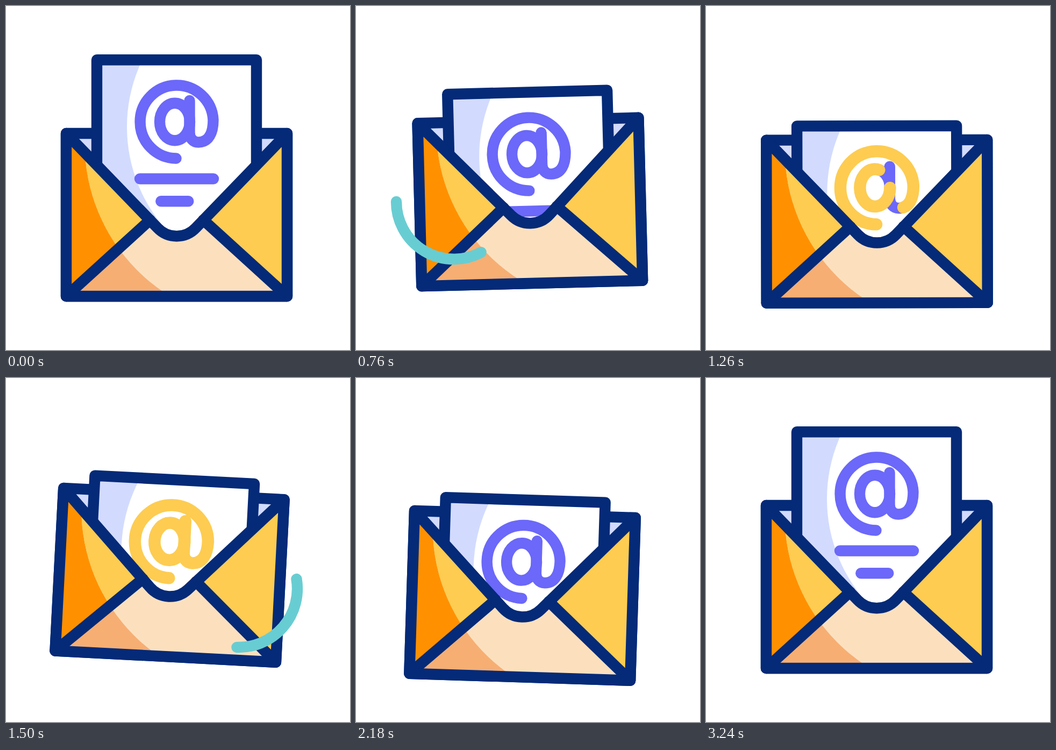
Animation, 640 px wide and 640 px high, one loop 3540 ms. Source, as an HTML page:

```html
<!DOCTYPE html>
<html lang="en">
<head>
<meta charset="utf-8">
<title>Mail</title>
<style>
  html, body { margin: 0; width: 100%; height: 100%; overflow: hidden; background: #fff; }
  svg { display: block; width: 100%; height: 100%; }
  .line { fill: none; stroke-width: 20.4; stroke-linecap: round; stroke-linejoin: round; }
  .navy { stroke: #042a78; }
  .ink { stroke: #6b68fa; }
  .glow { stroke: #fdcc51; stroke-width: 22.5; }
  .swoosh { stroke: #68cdd2; }
</style>
</head>
<body>
<svg viewBox="0 0 640 640">
  <defs>
    <clipPath id="paper"><path d="M169 100H466V430H169Z"/></clipPath>
    <clipPath id="lit"><circle cx="480" cy="256" r="333.5"/></clipPath>
    <path id="ring" pathLength="100" d="M316.5 283.5A68 68 0 1 1 385.5 212C385.5 236 377 253.5 358 253.5C348 253.5 341.5 246 341.5 235V176"/>
    <path id="bowl" pathLength="100" d="M342 215.5A28 34.7 0 1 1 286 215.5A28 34.7 0 1 1 342 215.5"/>
    <path id="side" d="M112 237L268 398L112 540Z"/>
    <path id="pocket" d="M112 237L282 413A49 49 0 0 0 353 413L523 237V540H112Z"/>
  </defs>

  <g id="mail">
    <path class="line navy" style="fill:#d2dbfe" d="M112 237H523V540H112Z"/>

    <g id="letter">
      <g clip-path="url(#paper)">
        <rect x="169" y="100" width="297" height="330" fill="#d2dbfe"/>
        <circle cx="512" cy="225" r="287" fill="#fff"/>
      </g>
      <path class="line navy" d="M169 425V100.3H466V425"/>
      <g class="line ink">
        <use href="#ring"/>
        <use href="#bowl"/>
        <path d="M249 321.5H386M288.3 363.3H339.3"/>
      </g>
      <g id="glow" class="line glow">
        <use href="#ring"/>
        <use href="#bowl"/>
      </g>
    </g>

    <use href="#pocket" fill="#f6ae73"/>
    <use href="#side" fill="#ff9100"/>
    <g clip-path="url(#lit)">
      <use href="#pocket" fill="#fce0be"/>
      <use href="#side" fill="#fdcc51"/>
    </g>
    <path d="M523 237L367 398L523 540Z" fill="#fdcc51"/>
    <path class="line navy" d="M112 540L268 398M523 540L367 398"/>
    <use href="#pocket" class="line navy"/>
  </g>

  <path id="left" class="line swoosh"/>
  <path id="right" class="line swoosh"/>
</svg>

<script>
const LOOP = 3540;
const $ = id => document.getElementById(id);
const mail = $('mail'), letter = $('letter'), glow = $('glow');

// Each track is a list of [time, value] keys.
const tilt = [[480, 0], [1050, -3], [1480, 3], [1890, -3], [2300, 3], [2810, 0]];
const lift = [[240, 0], [532, -40], [1169, 16.5], [1640, -31], [2190, 16.5], [2540, 0]];
const sink = [[490, 0], [890, 110.5], [2160, 110.5], [2730, 0]];
const glowHead = [[890, 0], [1420, 100]];
const glowTail = [[1520, 0], [2050, 100]];
const swooshes = [
  { el: $('left'), cx: 182, cy: 364, r: 107,
    head: [[480, 180], [800, 57]], tail: [[760, 180], [1040, 57]] },
  { el: $('right'), cx: 433, cy: 392, r: 109,
    head: [[1260, -9.5], [1590, 113]], tail: [[1540, -9.5], [1820, 113]] }
];

const ease = u => (1 - Math.cos(Math.PI * u)) / 2;

function at(keys, t) {
  if (t <= keys[0][0]) return keys[0][1];
  for (let i = 1; i < keys.length; i++) {
    const [t0, v0] = keys[i - 1], [t1, v1] = keys[i];
    if (t < t1) return v0 + (v1 - v0) * ease((t - t0) / (t1 - t0));
  }
  return keys[keys.length - 1][1];
}

function show(el, on) {
  el.style.display = on ? '' : 'none';
}

function drawSwoosh({ el, cx, cy, r, head, tail }, t) {
  const a = at(tail, t), b = at(head, t);
  show(el, Math.abs(a - b) > 0.05);
  const point = deg => {
    const k = deg * Math.PI / 180;
    return `${cx + r * Math.cos(k)} ${cy + r * Math.sin(k)}`;
  };
  el.setAttribute('d', `M${point(a)}A${r} ${r} 0 0 ${b > a ? 1 : 0} ${point(b)}`);
}

function draw(t) {
  mail.setAttribute('transform', `translate(0 ${at(lift, t)}) rotate(${at(tilt, t)} 317.5 138.5)`);
  letter.setAttribute('transform', `translate(0 ${at(sink, t)})`);

  const start = at(glowTail, t), length = at(glowHead, t) - start;
  show(glow, length > 0.05);
  glow.style.strokeDasharray = `${length} 300`;
  glow.style.strokeDashoffset = -start;

  swooshes.forEach(s => drawSwoosh(s, t));
}

let begin;
function tick(now) {
  if (begin === undefined) begin = now;
  draw((now - begin) % LOOP);
  requestAnimationFrame(tick);
}
draw(0);
requestAnimationFrame(tick);
</script>
</body>
</html>
```
